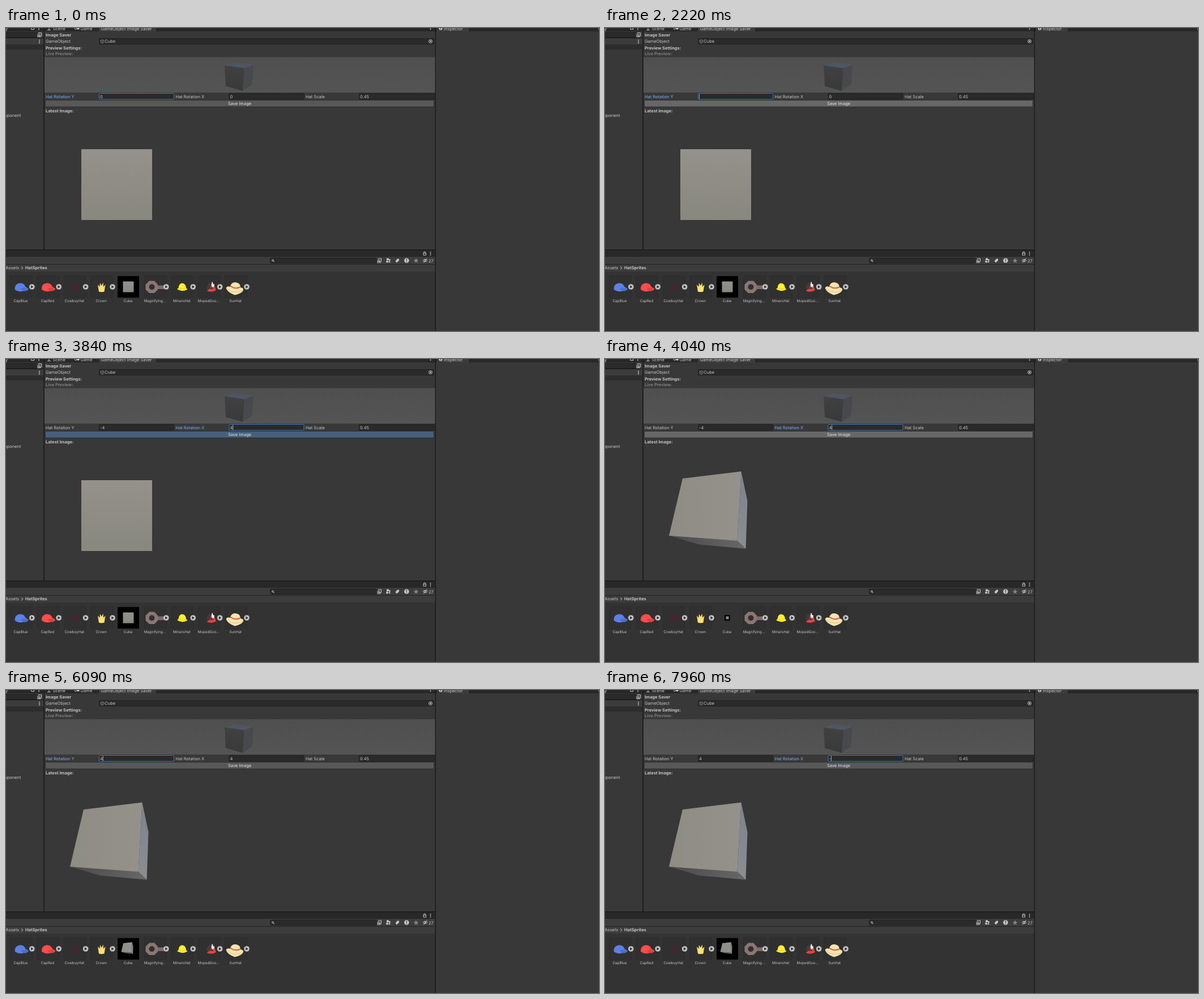
An HTML page for the animation above (8 s loop, 1047x535 px).

```html
<!DOCTYPE html>
<html lang="en">
<head>
<meta charset="utf-8">
<title>Image saver panel</title>
<style>
html, body { margin: 0; width: 100%; height: 100%; overflow: hidden; background: #383838; }
svg { display: block; font: 7.5px Inter, Roboto, sans-serif; text-rendering: geometricPrecision; }
text { fill: #c4c4c4; white-space: pre; }
.b { font-weight: 700; }
.mid { text-anchor: middle; }
.small { font-size: 6.3px; }
.bar { fill: #282828; }
.tool { fill: #3c3c3c; }
.gap { fill: #191919; }
.field { fill: #2a2a2a; stroke: #212121; stroke-width: 1; }
.line { fill: none; stroke: #c4c4c4; stroke-width: 1; }
.icon { fill: #c4c4c4; }
</style>
</head>
<body>
<svg width="1047" height="535" viewBox="0 0 1047 535">
  <defs>
    <linearGradient id="face" x2="0" y2="1"><stop stop-color="#95918c"/><stop offset="1" stop-color="#88887f"/></linearGradient>
    <linearGradient id="front"><stop stop-color="#8e8d84"/><stop offset="1" stop-color="#94918b"/></linearGradient>
    <linearGradient id="side" x2="0" y2="1"><stop stop-color="#7c838d"/><stop offset="1" stop-color="#8b8e91"/></linearGradient>
    <linearGradient id="under"><stop stop-color="#494949"/><stop offset="1" stop-color="#686868"/></linearGradient>
    <linearGradient id="view" x2="0" y2="1"><stop stop-color="#4f4f4f"/><stop offset="1" stop-color="#545454"/></linearGradient>
    <linearGradient id="dark" x2="0" y2="1"><stop stop-color="#414143"/><stop offset="1" stop-color="#393939"/></linearGradient>
    <g id="dots" class="icon"><circle cy="-2.5" r=".9"/><circle r=".9"/><circle cy="2.5" r=".9"/></g>
    <g id="pick"><path class="line" d="M-3-1V3.5H2V2M-2-3.5H3.5V2H-1V-2.5"/><path class="line" d="M-1 2L2-1"/></g>
    <g id="play"><circle r="4.8" fill="#c6c6c6"/><path d="M-1.7-2.7L2.8 0L-1.7 2.7Z" fill="#303030"/></g>
    <g id="cap"><path d="M15.5 461.5Q15 452 24 450.5Q32 449.500 34.500 457L40 460.500Q38 465 31 464.500Q22 467 15.500 461.500Z"/>
      <path d="M26 460Q32 456 39.500 461Q36 465 30 464Z" fill="#0002"/></g>
    <g id="flat"><rect x="133" y="214" width="125" height="125" fill="url(#face)"/></g>
    <g id="turned">
      <path d="M240.500 198.500L251.500 251L248.500 335L233.500 321Z" fill="url(#side)"/>
      <path d="M113 312L233.500 321L248.500 335L166 327.500Z" fill="url(#under)"/>
      <path d="M137 211L240.500 198.500L233.500 321L113 312Z" fill="url(#front)"/>
    </g>
  </defs>

  <!-- hierarchy column -->
  <rect class="bar" width="66" height="6"/>
  <rect class="tool" y="6" width="66" height="12"/>
  <rect class="field" x="-5" y="7.500" width="59" height="9"/>
  <rect class="gap" y="17" width="66" height="1"/>
  <rect class="tool" y="18" width="66" height="11"/>
  <rect y="29" width="66" height="9" fill="#2d2d2d"/>
  <text x="-1" y="3.500">y</text>
  <rect class="line" x="45" y="-2.500" width="4.500" height="5"/>
  <use href="#dots" x="58" y="0"/>
  <use href="#pick" x="59" y="12"/>
  <use href="#dots" x="59" y="24"/>
  <text x="26.500" y="156.500" text-anchor="end">Component</text>

  <!-- main tab bar -->
  <rect class="bar" x="68" width="690" height="6"/>
  <rect class="tool" x="164" width="101" height="6"/>
  <path class="line" d="M73 3.500H79M76-1V3"/>
  <text x="82.500" y="3.500">Scene</text>
  <circle class="line" cx="123" cy=".5" r="1.800"/><circle class="icon" cx="127.500" cy=".5" r="2.300"/>
  <text x="131.500" y="3.500">Game</text>
  <text x="167.500" y="3.500">GameObject Image Saver</text>
  <use href="#dots" x="749.500" y="-.5"/>

  <text class="b" x="70" y="14.700">Image Saver</text>
  <text x="70" y="26.300">GameObject</text>
  <rect class="field" x="164.500" y="18.500" width="591" height="10" rx="1"/>
  <path d="M167 22L170 20.500L173 22V25.500L170 27L167 25.500ZM167 22L170 23.500L173 22M170 23.500V27" fill="none" stroke="#929292" stroke-width=".7"/>
  <text x="174.300" y="26.300">Cube</text>
  <circle class="line" cx="749.500" cy="23.500" r="3"/><circle class="icon" cx="749.500" cy="23.500" r="1.400"/>
  <text class="b" x="70" y="37.500">Preview Settings:</text>
  <text class="b" x="70" y="48.200" style="fill:#7c7c7c">Live Preview:</text>

  <rect x="68" y="51.500" width="690" height="62.500" fill="url(#view)"/>
  <path d="M386 66L403 60.500L437 65L421 71Z" fill="#4e5563"/>
  <path d="M386 66L421 71L418 111L388 102.500Z" fill="url(#dark)"/>
  <path d="M421 71L437 65L434.500 99.500L418 111Z" fill="#47494c"/>

  <text id="labelY" x="70" y="124">Hat Rotation Y</text>
  <text id="labelX" x="299.500" y="124">Hat Rotation X</text>
  <text x="529" y="124">Hat Scale</text>
  <rect class="field" x="623.500" y="115.500" width="133" height="10.500" rx="1"/>
  <text x="625" y="124">0.45</text>
  <g id="fields"></g>

  <rect x="69.500" y="127.500" width="686" height="12" rx="1.500" fill="#282828"/>
  <rect id="save" x="70" y="128" width="685" height="10.700" rx="1"/>
  <text class="mid" x="412.500" y="136.300" style="fill:#e4e4e4">Save Image</text>
  <text class="b" x="70" y="148.500">Latest Image:</text>
  <use id="latest"/>

  <!-- inspector -->
  <rect class="bar" x="759" width="288" height="6"/>
  <rect class="tool" x="761" width="56" height="6"/>
  <circle class="icon" cx="767.500" cy=".7" r="3"/><path d="M767.500-1V2.500" stroke="#333"/>
  <text x="773" y="3.500">Inspector</text>
  <use href="#dots" x="1047" y="0"/>

  <!-- project browser -->
  <rect y="392" width="758" height="143" fill="#333"/>
  <rect class="bar" y="392" width="758" height="12"/>
  <rect class="tool" y="404" width="758" height="26"/>
  <rect y="417" width="758" height="1" fill="#232323"/>
  <rect class="gap" y="391" width="758" height="1.300"/>
  <rect class="gap" x="66.300" width="1.500" height="391"/>
  <rect class="gap" x="757.700" width="1.300" height="535"/>
  <rect x="737" y="397.500" width="4.500" height="3.500" class="line"/><path class="line" d="M737.700 397V395.500Q739.200 394 740.700 395.500V397"/>
  <use href="#dots" x="749.500" y="398.300"/>
  <rect class="field" x="466.500" y="406" width="188" height="9.500" rx="2"/>
  <circle class="line" cx="471" cy="410.300" r="1.400"/><path class="line" d="M472 411.500L474 413.300"/>
  <use href="#pick" x="659" y="410.500"/>
  <path class="icon" d="M672 406.500H676V410H672ZM675 414L677 410.500L679 414Z"/><circle class="icon" cx="673" cy="412.500" r="1.900"/><circle class="icon" cx="677.300" cy="409.500" r="1.600"/>
  <path class="icon" d="M687.500 411.500L691 407.500H694V410.500L690 414.500Z"/>
  <circle class="icon" cx="707.300" cy="410.500" r="4.300"/><path d="M707.300 407.500V411.300M707.300 412.300V413.500" stroke="#333" stroke-width="1.200"/>
  <path d="M724 406.200L725.200 409.200L728.400 409.400L726 411.500L726.800 414.600L724 412.900L721.200 414.600L722 411.500L719.600 409.400L722.800 409.200Z" fill="#858585"/>
  <path class="line" d="M736 410.500Q740 406 744 410.500Q740 415 736 410.500M737 414.500L743.500 406.500"/><circle class="icon" cx="740" cy="410.500" r="1.300"/>
  <text x="746" y="413.500">27</text>
  <text x="-.5" y="426.300">Assets</text>
  <path class="line" d="M27 421.300L30 423.700L27 426.200" stroke-width=".8"/>
  <text class="b" x="34" y="426.300">HatSprites</text>

  <g id="tiles"></g>
  <use href="#cap" fill="#5b80e8"/>
  <use href="#cap" x="47.400" fill="#ff4c4c"/>
  <path d="M113 457Q116 459 117 453Q122 450 128 453Q129 459 132 457Q131 464 122 464.500Q114 464 113 457Z" fill="#40292b"/>
  <path d="M164 465.500L162 453L165.500 457L166 450L168.700 455L171.500 449.500L172 457L175.500 453L173.500 465.500Q168.500 467 164 465.500Z" fill="#fadf70"/>
  <path d="M268 454.500H279L282 456V459.500L279 461H268Z" fill="#806b6a"/>
  <path d="M253 446.500H262L268 453V462L262 468H253L246.500 462V453Z" fill="#8c7674"/><circle cx="257.500" cy="457.300" r="5" fill="#303030"/>
  <path d="M302 461L304.500 459Q305 451 311 450.500Q317.500 451 318 459L320.500 461.500Q311 467 302 461Z" fill="#fff02a"/>
  <path d="M304.500 459.500Q311 462.500 318 459.500" fill="none" stroke="#d6c91f" stroke-width=".8"/>
  <path d="M354 461Q355 451 361 449L364 460Z" fill="#3f3b3d"/>
  <path d="M354.500 464L361 459L362.500 452H366.500L371 463Q363 468 354.500 464Z" fill="#e34443"/>
  <path d="M359 461L363 457L367 461Z" fill="#5d3939"/>
  <path d="M363.500 448.500L365 448.700L365.500 452L368 452.700L367.500 457L364.500 457.500L362.700 454Z" fill="#eee"/>
  <path d="M388.500 459Q390 455 396 457Q397 449 405 449Q414 450 414 458Q420 459 419 463Q416 469 404 471.500Q391 467 388.500 459Z" fill="#f4e5ae"/>
  <path d="M396.500 455.500Q404 462 413.500 457.500" fill="none" stroke="#df5b48" stroke-width="2"/>
  <path d="M391 461Q403 470 417 464" fill="none" stroke="#dbc98d"/>
  <g id="plays"></g>

  <g id="thumb">
    <rect id="black"/>
    <use id="mini"/>
  </g>
</svg>
<script>
const $ = id => document.getElementById(id);
const set = (el, attrs) => { for (const k in attrs) el.setAttribute(k, attrs[k]); };
const add = (parent, tag, attrs = {}, text = '') => {
  const el = document.createElementNS('http://www.w3.org/2000/svg', tag);
  set(el, attrs);
  el.textContent = text;
  return parent.appendChild(el);
};

const pitch = 47.4, cubeTile = 4;
['CapBlue', 'CapRed', 'CowboyHat', 'Crown', 'Cube', 'Magnifying...', 'MinersHat', 'MopedGoo...', 'SunHat'].forEach((name, i) => {
  const x = i * pitch;
  add($('tiles'), 'text', { class: 'mid small', x: 26 + x, y: 484.3 }, name);
  if (i === cubeTile) return;
  add($('tiles'), 'rect', { x: 7.5 + x, y: 437.5, width: 38.5, height: 38.5, rx: 1, fill: '#303030', stroke: '#2b2b2b', 'stroke-width': .6 });
  add($('plays'), 'use', { href: '#play', x: 45.8 + x, y: 457 });
});

function makeField(x) {
  const group = $('fields');
  return {
    x: x + 2,
    box: add(group, 'rect', { class: 'field', x: x + .5, y: 115.5, width: 132, height: 10.5, rx: 1 }),
    mark: add(group, 'rect', { y: 116, height: 10, fill: '#3662a0' }),
    text: add(group, 'text', { x: x + 2, y: 124 }),
    caret: add(group, 'rect', { y: 116.3, width: .8, height: 9.2, fill: '#c8c8c8' })
  };
}
const fields = { Y: makeField(164), X: makeField(393.5) };

// time, Y value, X value, focused field, edit mode, hovered field
const inputs = [
  [0, '0', '0', 'Y'],
  [760, '0', '0', 'Y', 'all'],
  [2220, '', '0', 'Y', 'caret'],
  [2490, '-', '0', 'Y', 'caret'],
  [2560, '-4', '0', 'Y', 'caret'],
  [3300, '-4', '0', 'X'],
  [3420, '-4', '0', 'X', 'all'],
  [3570, '-4', '4', 'X', 'caret'],
  [5100, '-4', '4', 'Y'],
  [5230, '-4', '4', 'Y', 'all'],
  [6020, '', '4', 'Y', 'caret'],
  [6090, '4', '4', 'Y', 'caret'],
  [7230, '4', '4', 'Y', 'caret', 'X'],
  [7430, '4', '4', 'X'],
  [7510, '4', '4', 'X', 'all'],
  [7960, '4', '-', 'X', 'caret']
];
const normal = '#585858', hover = '#676767', pressed = '#46607c';
const button = [[0, normal], [500, hover], [3100, normal], [3840, pressed], [4040, hover], [4900, normal]];
const at = (list, t) => list.findLast(step => step[0] <= t);

function drawField(name, value, focus, mode, hovered) {
  const f = fields[name], active = focus === name;
  f.text.textContent = value;
  const width = value ? f.text.getComputedTextLength() : 0;
  f.box.style.stroke = active ? '#3a79bb' : hovered === name ? '#656565' : '';
  set(f.mark, { x: f.x, width: active && mode === 'all' ? width : 0 });
  set(f.caret, { x: f.x + width, visibility: active && mode === 'caret' ? 'visible' : 'hidden' });
  $('label' + name).style.fill = active ? '#7baefa' : '';
}

function drawThumb(t) {
  const loading = t >= 4040 && t < 4110;
  const size = loading ? 10 : 38, scale = loading ? .04 : .152;
  const shape = t < 4110 ? '#flat' : '#turned';
  set($('black'), { x: 216 - size / 2, y: 457 - size / 2, width: size, height: size });
  set($('mini'), { href: shape, transform: `translate(216 457) scale(${scale}) translate(-195.5 -276.5)` });
}

function draw() {
  const t = performance.now() % 8000;
  const [, y, x, focus, mode, hovered] = at(inputs, t);
  drawField('Y', y, focus, mode, hovered);
  drawField('X', x, focus, mode, hovered);
  $('save').style.fill = at(button, t)[1];
  set($('latest'), { href: t < 4040 ? '#flat' : '#turned' });
  drawThumb(t);
  requestAnimationFrame(draw);
}
draw();
</script>
</body>
</html>
```
